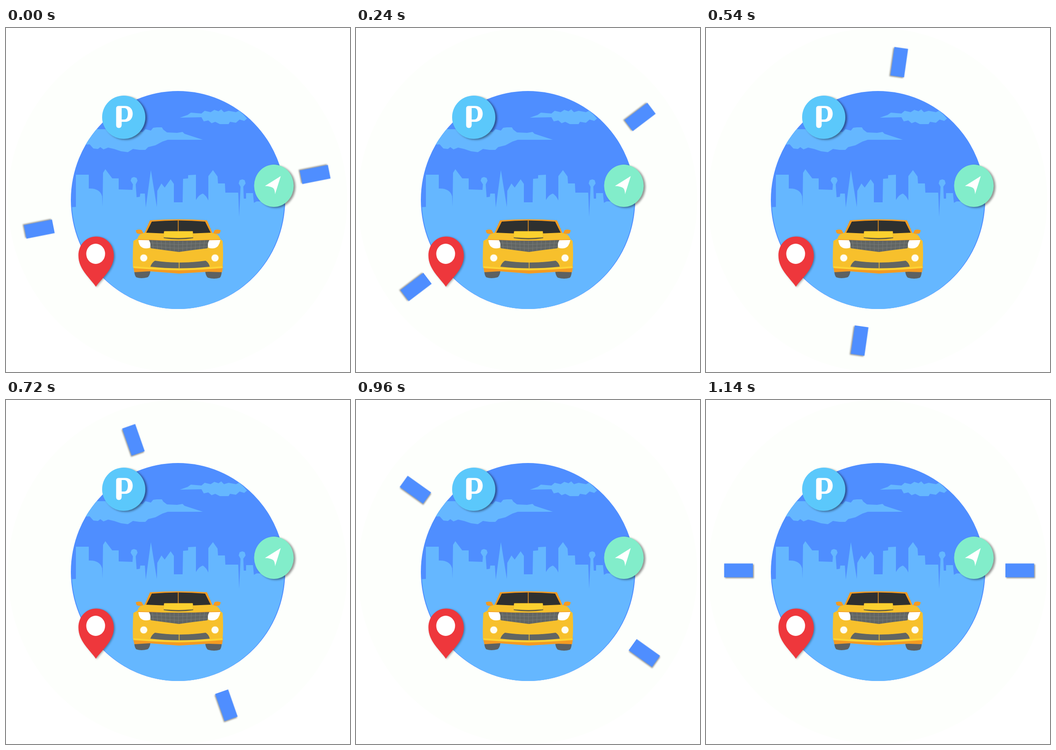
Recreate the animation shown at these times as an HTML page. Size 748 by 748 pixels, loop 1.2 s.

```html
<!DOCTYPE html>
<html lang="en">
<head>
<meta charset="utf-8">
<title>City parking</title>
<style>
  html, body { margin: 0; width: 100%; height: 100%; overflow: hidden; background: #fff; }
  svg { display: block; width: 100%; height: 100%; }
  .badge { filter: drop-shadow(4px 2px 2px rgba(0, 0, 0, .42)); }
  .dash { filter: drop-shadow(-2px -2px 1.4px rgba(0, 0, 0, .42)); }
</style>
</head>
<body>
<svg viewBox="0 0 748 748">
  <defs>
    <clipPath id="disc"><ellipse cx="374" cy="374" rx="233" ry="237"/></clipPath>
    <clipPath id="ground"><ellipse cx="374" cy="374" rx="231" ry="237"/></clipPath>
    <clipPath id="grille"><path d="M311 461Q375 464 442 461L438 479L405 483L376 487L345 483L315 479Z"/></clipPath>
  </defs>

  <ellipse cx="373" cy="374" rx="369" ry="374" fill="#fdfffc"/>
  <ellipse cx="374" cy="374" rx="233" ry="237" fill="#4f8eff"/>

  <g fill="#65b7ff">
    <g clip-path="url(#disc)">
      <path d="M428 243L388 230L384 226L372 228L350 227L342 221L339 216H328L320 217L315 223L303 220L297 226L215 220H190L160 254L182 253L190 262L200 263L205 259L212 264L222 260L235 263L250 268L265 270L276 263L290 265H303L309 259L325 255L340 247L352 243Z"/>
      <path d="M378 195L395 189L402 184L425 186L432 180L445 183L453 178L462 181L468 177L474 183L484 180L500 183L507 180L516 188L524 197L518 202L508 199L500 206L487 204L484 209H465L455 204L447 207L440 201L430 203L425 194Z"/>
    </g>
    <path clip-path="url(#ground)" d="M130 390L152 389V319H180V349Q204 348 209 366L210 388L211 315L216 307L231 327H245V351L275 352L276 340L271 332L273 326L278 324L284 326L286 332L282 340L284 368L291 367L292 360H302L304 390L315 309L328 389L329 354L338 338L345 347L358 329L365 339V379H384L385 328L396 327V320L413 319V374Q420 362 428 360Q435 364 440 375V322L450 309L460 323L461 338H476L477 358H505L507 410L510 345L506 338L508 331L514 329L519 331L521 338L516 345L517 371H522V359H537L539 380L545 377H620V620H130Z"/>
  </g>

  <g id="car">
    <path fill="#5c6162" d="M279 528H314Q313 538 308 542Q294 546 283 542Q279 537 279 528ZM433 528H469Q469 539 465 543Q453 547 439 543Q434 539 433 528Z"/>
    <path fill="#f49b22" d="M300 448L313 418Q374 414 437 418L450 448ZM282 440Q287 437 295 439L299 447Q288 449 284 446ZM467 440Q462 437 454 439L450 447Q461 449 465 446Z"/>
    <path fill="#2f302f" d="M304 447L317 421Q374 416 433 421L446 447Z"/>
    <path stroke="#f49b22" stroke-width="1.5" d="M374.5 418V444"/>
    <path fill="#f49b22" d="M276 517L279 531L312 529L376 534L440 530L470 531L472 517Z"/>
    <path fill="#f7c02c" d="M302 445Q374 449 447 445L459 449Q465 454 466 459L471 463Q473 490 471 520Q425 526 376 526Q325 526 276 520Q275 490 277 463L286 458Q288 451 293 448Z"/>
    <path fill="none" stroke="#fdd334" stroke-width="4" d="M277 520Q325 524 376 525Q425 524 471 520"/>
    <path fill="none" stroke="#f49b22" stroke-width="1.5" d="M287 460L314 461Q375 465 440 461L466 460"/>
    <path fill="#5c5b43" d="M343 454Q375 459 407 454V457Q375 462 343 457Z"/>
    <path fill="#fbd12f" stroke="#e6aa2a" stroke-width=".6" d="M344 442H406L407 455Q375 458 342 455Z"/>
    <g clip-path="url(#grille)">
      <path fill="#616563" d="M305 455H450V490H305Z"/>
      <path id="mesh" fill="none" stroke="#7b7e7b" stroke-width=".8"/>
    </g>
    <path fill="#fff" d="M288 461L311 461.500Q316 470 313 478Q299 482 292 474Q288 468 288 461ZM466 461L442 461.500Q437 470 440 478Q454 482 461 474Q465 468 466 461Z"/>
    <g fill="#fffdf2" stroke="#fbd45c">
      <circle cx="299.500" cy="500" r="8"/><circle cx="454.500" cy="500" r="8"/>
    </g>
    <path fill="#616563" d="M314 519Q317 510 324 506Q376 514 434 506Q441 510 443 519Q376 526 314 519Z"/>
    <path stroke="#f7c02c" stroke-width="1.5" d="M376.500 509V525"/>
  </g>

  <g class="badge">
    <circle cx="256" cy="194" r="47" fill="#5bc8fb"/>
  </g>
  <path fill="#fff" fill-rule="evenodd" d="M239.500 175Q239.500 169.500 245 169.500H259C270 169.500 275.500 177 275.500 186C275.500 196 270 204 259 204H251.500V211Q251 217 245.500 217.500Q239.500 217 239.500 211ZM251.500 174V199H257C263 199 265 193 265 186C265 179 263 174 257 174Z"/>

  <g class="badge">
    <ellipse cx="582.500" cy="343" rx="43" ry="46" fill="#82edca"/>
  </g>
  <path fill="#fff" d="M597.500 322L563 343.500Q577 344 582 349Q585 354 585 361.500Z"/>

  <path class="badge" style="filter:drop-shadow(2px 1px 2px rgba(0,0,0,.35))" fill="#ee373c" d="M195.500 562.500C182 543 157.500 524 157.500 495C157.500 471 174 453.500 196 453.500C218 453.500 234.500 471 234.500 495C234.500 524 209 543 195.500 562.500Z"/>
  <ellipse cx="195" cy="491" rx="20.500" ry="22" fill="#fff"/>

  <g id="orbit" fill="#4f8eff">
    <rect class="dash" x="34.500" y="362.500" width="62.500" height="30"/>
    <rect class="dash" x="646" y="362.500" width="62.500" height="30"/>
  </g>
</svg>
<script>
  const LOOP = 1200, STEP = 60;
  // [step, degrees turned]
  const keys = [[0, 11.2], [4, 37.2], [6, 53], [9, 81.9], [12, 109.3], [16, 144.5], [18, 166.3], [19, 180]];
  const orbit = document.getElementById('orbit');

  let mesh = 'M305 467L376 471L447 467M305 474L376 479L447 474';
  for (let x = 318; x < 440; x += 9.5) mesh += `M${x} 458L${x + (376 - x) * .06} 490`;
  document.getElementById('mesh').setAttribute('d', mesh);

  function turn(step) {
    const i = Math.max(1, keys.findIndex(k => k[0] >= step));
    const [s0, a0] = keys[i - 1], [s1, a1] = keys[i];
    return a0 + (a1 - a0) * (step - s0) / (s1 - s0);
  }

  const start = performance.now();
  function draw() {
    const t = (performance.now() - start) % LOOP;
    orbit.setAttribute('transform', `rotate(${-turn(Math.floor(t / STEP))} 374 374)`);
    requestAnimationFrame(draw);
  }
  draw();
</script>
</body>
</html>
```
